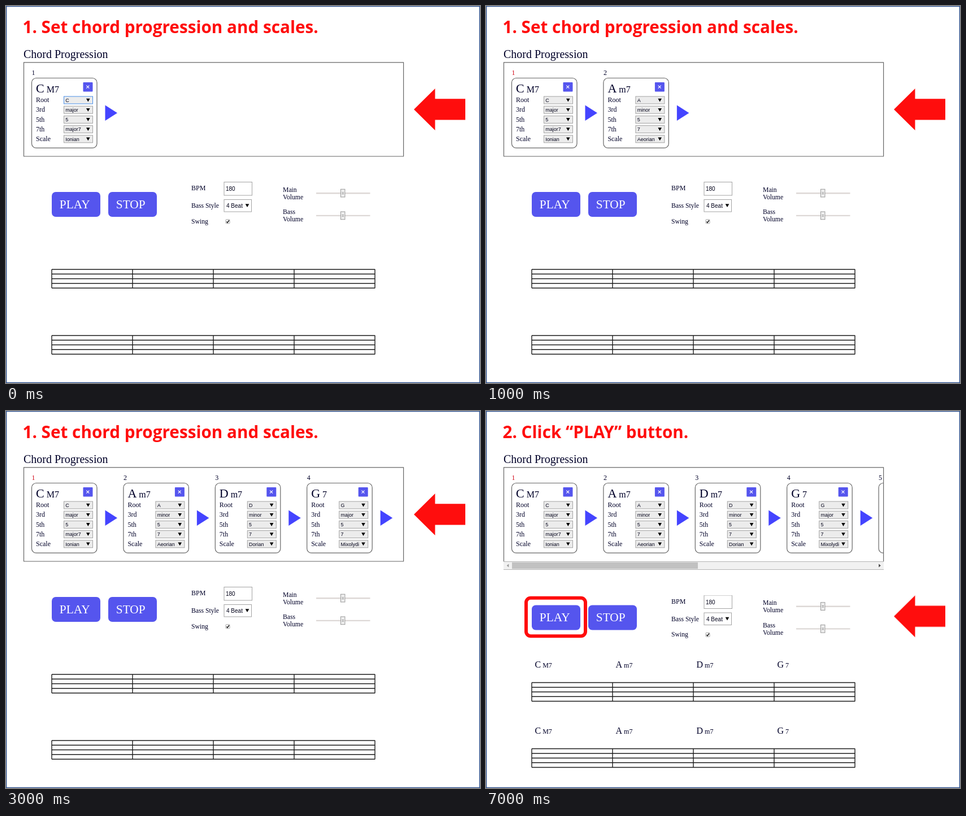
An HTML page for the animation above (8 s loop, 839 by 667 pixels).

```html
<!DOCTYPE html>
<html lang="en">
<head>
<meta charset="utf-8">
<title>Chord progression tutorial</title>
<style>
html, body { margin: 0; width: 100%; height: 100%; overflow: hidden; background: #fff; }
svg { display: block; width: 839px; height: 667px; }
text { font-family: "Liberation Serif", "Times New Roman", serif; font-size: 12px; fill: #000028; }
.title { font: bold 29.7px "Open Sans", "Noto Sans", sans-serif; fill: #ff0d0d; }
.heading { font-size: 20px; }
.ui { font: 9px "Liberation Sans", Arial, sans-serif; fill: #000018; }
.big { font-size: 10px; }
.small { font-size: 11.7px; }
.button { font-size: 21.33px; fill: #fff; }
.line { fill: none; stroke: #666; stroke-width: 1.2; }
.select { fill: #ececec; stroke: #a4a4a4; }
.field { fill: #fff; stroke: #a4a4a4; }
.staff { fill: none; stroke: #1c1c1c; stroke-width: 1.4; }
.blue { fill: #5555ee; }
.red { fill: #ff0d0d; }

.at1, .at2, .at3, .late, .early, .shift, .jump, .focus, .tint {
  animation: 8s step-end infinite;
}
.at1 { animation-name: at1; }
.at2 { animation-name: at2; }
.at3 { animation-name: at3; }
.late { animation-name: late; }
.early { animation-name: early; }
.shift { animation-name: shift; }
.jump { animation-name: jump; }
.focus { animation-name: focus; }
.tint { animation-name: tint; }
@keyframes at1 { 0% { visibility: hidden; } 12.5%, 100% { visibility: visible; } }
@keyframes at2 { 0% { visibility: hidden; } 25%, 100% { visibility: visible; } }
@keyframes at3 { 0% { visibility: hidden; } 37.5%, 100% { visibility: visible; } }
@keyframes late { 0% { visibility: hidden; } 87.5%, 100% { visibility: visible; } }
@keyframes early { 0% { visibility: visible; } 87.5%, 100% { visibility: hidden; } }
@keyframes shift { 0% { transform: none; } 87.5%, 100% { transform: translateY(14.5px); } }
@keyframes jump { 0% { transform: none; } 87.5%, 100% { transform: translateY(180.3px); } }
@keyframes focus { 0% { stroke: #4a8fe8; } 12.5%, 100% { stroke: #a4a4a4; } }
@keyframes tint {
  0%, 25% { fill: #000028; }
  12.5%, 37.5%, 100% { fill: #d00010; }
}
</style>
</head>
<body>
<svg id="stage" viewBox="0 0 839 667"></svg>
<script>
const CARD_STEP = 162.4;
const chords = [
  { root: "C", kind: "M7", picks: ["C", "major", "5", "major7", "Ionian"], letter: 0.667 },
  { root: "A", kind: "m7", picks: ["A", "minor", "5", "7", "Aeorian"], letter: 0.722 },
  { root: "D", kind: "m7", picks: ["D", "minor", "5", "7", "Dorian"], letter: 0.722 },
  { root: "G", kind: "7", picks: ["G", "major", "5", "7", "Mixolydi"], letter: 0.722 }
];
const labels = ["Root", "3rd", "5th", "7th", "Scale"];

const text = (x, y, str, cls = "", size = "") =>
  `<text x="${x}" y="${y}" class="${cls}"${size && ` style="font-size:${size}px"`}>${str}</text>`;
const rect = (x, y, w, h, cls, r = 0) =>
  `<rect x="${x}" y="${y}" width="${w}" height="${h}" rx="${r}" class="${cls}"/>`;
const path = (d, cls = "") => `<path d="${d}" class="${cls}"/>`;
const group = (content, cls = "", x = 0) =>
  `<g class="${cls}"><g transform="translate(${x} 0)">${content}</g></g>`;
const caret = (x, y) => path(`M${x - 3.3} ${y - 2.8}h6.6l-3.3 5.8z`);

const chordName = (x, y, { root, kind, letter }, size, subSize) =>
  text(x, y, root, "", size) +
  text(x + letter * size + subSize / 4, y, kind, "", subSize);

function card(chord, i) {
  const rows = labels.map((label, row) => {
    const y = 166.5 + row * 17.2;
    const cls = "select" + (i === 0 && row === 0 ? " focus" : "");
    return text(53, y + 3.6, label) + rect(102.5, y - 6.5, 51, 13, cls) +
      text(105.3, y + 3.3, chord.picks[row], "ui") + caret(145.3, y);
  }).join("");
  return text(45.5, 122, i + 1, i === 0 ? "tint" : "") +
    rect(45.5, 127.5, 115.5, 123.7, "line", 8) +
    chordName(53, 152.5, chord, 22, 16) +
    rect(136.5, 135, 17, 16.5, "blue", 1) +
    `<path d="M142.3 140.7l5 5m0-5l-5 5" stroke="#fff" stroke-width="1.2"/>` +
    rows +
    `<path d="M175.5 175.5L197 189.2L175.5 203z" fill="#4444ff"/>`;
}

function slider(y) {
  return `<path d="M549 ${y + .2}H644.5" stroke="#ddd8d6" stroke-width="2.4"/>` +
    `<rect x="592.5" y="${y - 6.8}" width="7.4" height="13.8" fill="#eee" stroke="#999"/>` +
    `<path d="M594.5 ${y - 1}h3.5m-3.5 2.4h3.5" stroke="#888" stroke-width="1"/>`;
}

function staff(top) {
  let d = "";
  for (let i = 0; i < 5; i++) d += `M81 ${top + i * 8.25}H653.3`;
  for (let i = 0; i < 5; i++) d += `M${81 + i * 143} ${top}v33`;
  const names = chords.map((c, i) => chordName(86.5 + i * 143, top - 26.5, c, 16, 12)).join("");
  return path(d, "staff") + group(names, "late");
}

const cards = chords.map((c, i) => group(card(c, i), i ? "at" + i : "", i * CARD_STEP)).join("");
const nextCard = text(695, 122, "5") + rect(695.1, 127.5, 115.5, 123.7, "line", 8);

const scrollbar = rect(31, 266, 673, 15, "track") +
  `<path d="M31 266.3h673v14.4h-673z" fill="#f1f1f1"/>` +
  `<path d="M46 267.8h329v11.5h-329z" fill="#c1c1c1"/>` +
  `<path d="M40.3 270.5v6l-3.6-3z" fill="#999"/>` +
  `<path d="M695.2 270.5v6l3.6-3z" fill="#444"/>`;

const controls =
  rect(81, 329, 86, 44, "blue", 7) + text(94.8, 357.5, "PLAY", "button") +
  rect(181, 329, 86, 44, "blue", 7) + text(194.8, 357.5, "STOP", "button") +
  text(328, 326, "BPM") + rect(386, 311.5, 49.5, 23.5, "field") + text(389, 327, "180", "ui big") +
  text(328, 357, "Bass Style", "small") + rect(386, 342.5, 48.5, 21.5, "field") +
  text(390, 357, "4 Beat", "ui big") + caret(427, 353) +
  text(328, 384.5, "Swing", "small") + rect(389, 377.8, 7, 7, "field", 1) +
  `<path d="M390.3 381.4l1.7 1.8l3-4.2" fill="none" stroke="#222" stroke-width="1.5"/>` +
  text(490, 328.5, "Main", "small") + text(490, 341.5, "Volume", "small") + slider(331) +
  text(490, 368, "Bass", "small") + text(490, 381, "Volume", "small") + slider(370.7);

document.getElementById("stage").innerHTML =
  `<clipPath id="panel"><path d="M31 99h672.5v182h-672.5z"/></clipPath>` +
  text(29.5, 48, "1. Set chord progression and scales.", "title early") +
  text(29.5, 48, "2. Click “PLAY” button.", "title late") +
  text(31, 92, "Chord Progression", "heading") +
  cards +
  `<g clip-path="url(#panel)">${group(nextCard, "late")}</g>` +
  path("M31.5 266V99.8H703.6V266", "line") +
  path("M31 266H704", "line early") +
  group(scrollbar, "late") +
  group(controls + staff(466) + staff(583), "shift") +
  `<rect x="71" y="330.7" width="105" height="67.5" rx="8" class="late" fill="none" stroke="#ff0d0d" stroke-width="6"/>` +
  group(path("M722 183L759.5 146V164.2H813V201.5H759.5V220z", "red"), "jump") +
  `<rect x=".6" y=".6" width="837.8" height="665.8" fill="none" stroke="#2f528f" stroke-width="1.4"/>`;
</script>
</body>
</html>
```
